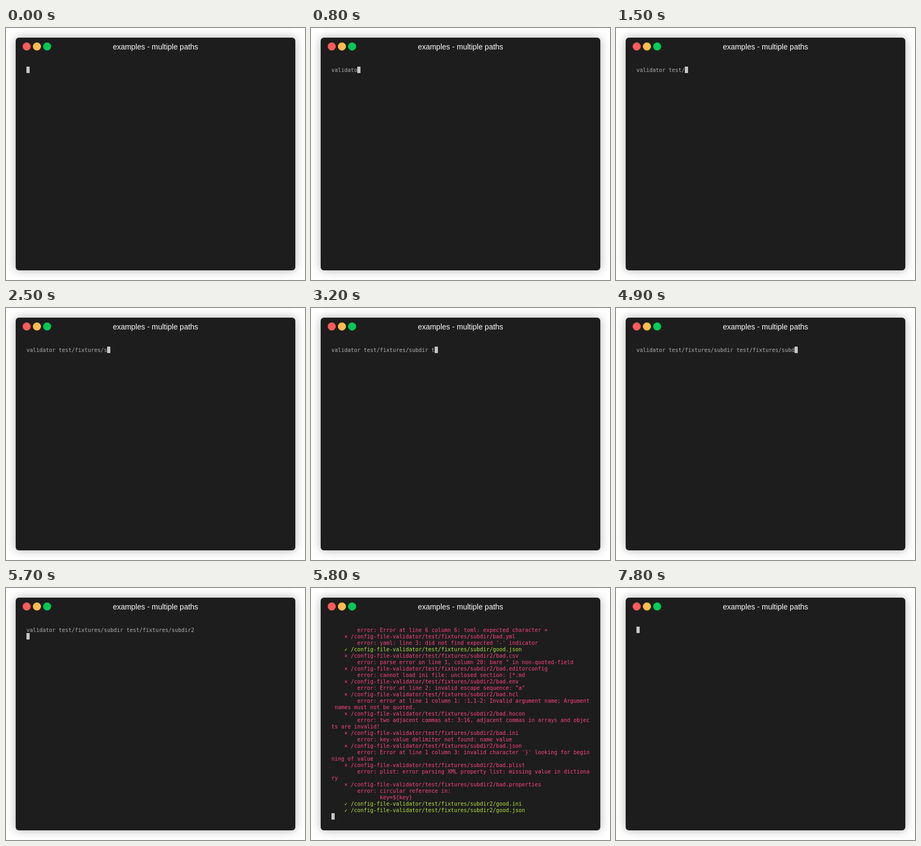
An HTML page with a canvas for the animation above (7900 ms loop, 556x470 px).

```html
<!DOCTYPE html>
<html lang="en">
<head>
<meta charset="utf-8">
<title>Terminal</title>
<style>
  html, body { margin: 0; width: 100%; height: 100%; overflow: hidden; background: #fff; }
  .window {
    position: absolute; left: 18px; top: 18px; width: 520px; height: 434px;
    border-radius: 6px; background: #1d1d1d; box-shadow: 0 0 18px rgba(0, 0, 0, .3);
  }
  .title {
    position: absolute; left: 0; top: 9px; width: 100%; text-align: center;
    font: 14px/16px "Liberation Sans", Arial, sans-serif; color: #fff;
  }
  .button { position: absolute; top: 9px; width: 15px; height: 15px; border-radius: 50%; }
  canvas { position: absolute; left: 0; top: 0; }
</style>
</head>
<body>
<div class="window">
  <div class="button" style="left: 13px; background: #ff5c5c"></div>
  <div class="button" style="left: 32px; background: #ffbd4c"></div>
  <div class="button" style="left: 51px; background: #00ca56"></div>
  <div class="title">examples - multiple paths</div>
</div>
<canvas width="556" height="470"></canvas>
<script>
const LOOP = 7900, KEY = 100, ENTER = 5700, PRINT = 5800, CLEAR = 7800;
const LEFT = 38, TOP = 72, CELL = 6, ROW = 12, BASELINE = 10;
const GREY = '#afafaf', RED = '#fc4384', GREEN = '#b3e33b', CURSOR = '#c7c7c7';

const command = 'validator test/fixtures/subdir test/fixtures/subdir2';
const root = '/config-file-validator/test/fixtures/';
const pad = n => ' '.repeat(n);
const bad = path => `${pad(4)}× ${root}${path}`;
const good = path => `${pad(4)}✓ ${root}${path}`;
const error = message => `${pad(8)}error: ${message}`;

const lines = [
  error('Error at line 6 column 6: toml: expected character ='),
  bad('subdir/bad.yml'),
  error("yaml: line 3: did not find expected '-' indicator"),
  good('subdir/good.json'),
  bad('subdir2/bad.csv'),
  error('parse error on line 1, column 20: bare " in non-quoted-field'),
  bad('subdir2/bad.editorconfig'),
  error('cannot load ini file: unclosed section: [*.md'),
  bad('subdir2/bad.env'),
  error('Error at line 2: invalid escape sequence: "a"'),
  bad('subdir2/bad.hcl'),
  error('error at line 1 column 1: :1,1-2: Invalid argument name; Argument names must not be quoted.'),
  bad('subdir2/bad.hocon'),
  error('two adjacent commas at: 3:16, adjacent commas in arrays and objects are invalid!'),
  bad('subdir2/bad.ini'),
  error('key-value delimiter not found: name value'),
  bad('subdir2/bad.json'),
  error("Error at line 1 column 3: invalid character '}' looking for beginning of value"),
  bad('subdir2/bad.plist'),
  error('plist: error parsing XML property list: missing value in dictionary'),
  bad('subdir2/bad.properties'),
  error('circular reference in:'),
  pad(15) + 'key=${key}',
  good('subdir2/good.ini'),
  good('subdir2/good.json')
];

// Wrap at 80 columns.
const rows = lines.flatMap(line => {
  const color = line.includes('✓') ? GREEN : RED;
  return line.match(/.{1,80}/g).map(text => ({ text, color }));
});

const canvas = document.querySelector('canvas');
const ctx = canvas.getContext('2d');
ctx.font = '10px "DejaVu Sans Mono", monospace';

// Every character sits in its own terminal cell.
function write(text, row, color) {
  ctx.fillStyle = color;
  [...text].forEach((char, col) =>
    ctx.fillText(char, LEFT + col * CELL, TOP + row * ROW + BASELINE));
}

function drawCursor(col, row) {
  ctx.fillStyle = CURSOR;
  ctx.fillRect(LEFT + col * CELL, TOP + row * ROW, CELL, ROW);
}

function draw(time) {
  const t = time % LOOP;
  ctx.clearRect(0, 0, canvas.width, canvas.height);
  if (t >= PRINT && t < CLEAR) {
    rows.forEach(({ text, color }, row) => write(text, row, color));
    drawCursor(0, rows.length);
    return;
  }
  const typed = t < CLEAR ? command.slice(0, Math.floor(t / KEY)) : '';
  write(typed, 0, GREY);
  if (t >= ENTER && t < CLEAR) drawCursor(0, 1);
  else drawCursor(typed.length, 0);
}

const start = performance.now();
function tick() {
  draw(performance.now() - start);
  requestAnimationFrame(tick);
}
tick();
</script>
</body>
</html>
```
